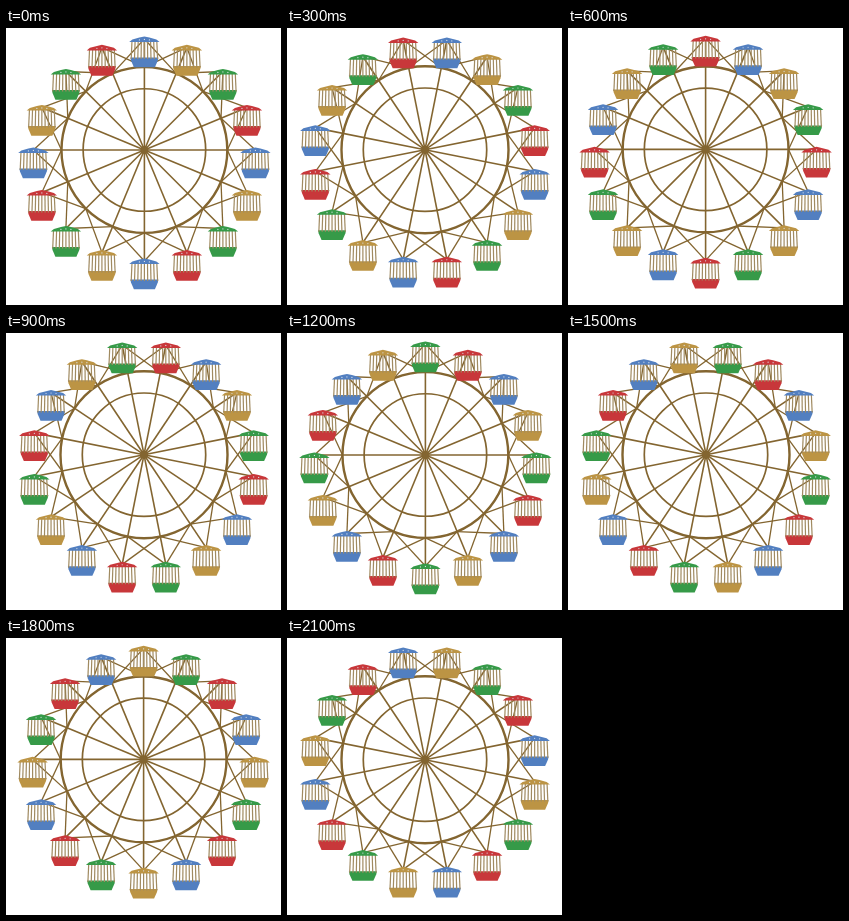
Animation of 275 by 277 pixels, one loop 2.4 s. Source, as an HTML page with a canvas:

```html
<!DOCTYPE html>
<html lang="en">
<head>
<meta charset="utf-8">
<title>Ferris wheel</title>
<style>
html, body { margin: 0; width: 100%; height: 100%; overflow: hidden; background: #fff; }
canvas { display: block; }
</style>
</head>
<body>
<canvas id="stage" width="275" height="277"></canvas>
<script>
const ctx = document.getElementById('stage').getContext('2d');
const BROWN = '#836530', BAR = '#a08a60';
const COLORS = ['#527fc0', '#bc9444', '#369a48', '#c8373a'];
const COUNT = 16, STEP = Math.PI * 2 / COUNT;
const POSES = 8, HOLD = 300;

const polar = (r, a) => [r * Math.sin(a), -r * Math.cos(a)];

function line(from, to, width, color = BROWN) {
  ctx.strokeStyle = color;
  ctx.lineWidth = width;
  ctx.beginPath();
  ctx.moveTo(...from);
  ctx.lineTo(...to);
  ctx.stroke();
}

function ring(r, width) {
  ctx.strokeStyle = BROWN;
  ctx.lineWidth = width;
  ctx.beginPath();
  ctx.arc(0, 0, r, 0, Math.PI * 2);
  ctx.stroke();
}

function dot(x, y, r, color) {
  ctx.fillStyle = color;
  ctx.beginPath();
  ctx.arc(x, y, r, 0, Math.PI * 2);
  ctx.fill();
}

// Fills a shape given by its right half, mirrored to the left
function symmetric(half, color) {
  const mirror = half.map(([x, y]) => [-x, y]).reverse();
  ctx.fillStyle = color;
  ctx.beginPath();
  [...half, ...mirror].forEach(p => ctx.lineTo(...p));
  ctx.fill();
}

function cabin([x, y], color) {
  ctx.save();
  ctx.translate(x, y);
  symmetric([[14, 18.5], [13.4, 21.5], [10.5, 28.2]], color);
  for (let i = -4; i <= 4; i++) line([i * 3.1, 2], [i * 3.3, 20], 1.2, BAR);
  symmetric([[0, -2.6], [5, -1.4], [12, 0.4], [15.2, 3]], color);
  for (let i = -1; i <= 1; i++) dot(i * 5, 0.4 + Math.abs(i) * 0.5, 0.6, '#dde3ea');
  ctx.restore();
}

function draw(pose) {
  // The axle sways slightly, and in-between poses are a touch larger
  const sway = Math.cos(pose * Math.PI / 2);
  const radius = 111 + 0.8 * (pose % 2);
  const rim = radius * 0.747;
  const angle = i => (i + pose / 2) * STEP;

  ctx.clearRect(0, 0, 275, 277);
  ctx.save();
  ctx.translate(138 + sway * 0.4, 121.7 + sway * 0.3);
  ring(rim, 2.4);
  ring(radius * 0.552, 1.7);
  for (let i = 0; i < COUNT; i++) {
    const pivot = polar(radius, angle(i));
    line([0, 0], pivot, 1.6);
    line(pivot, polar(rim, angle(i - 1)), 1.3);
    line(pivot, polar(rim, angle(i + 1)), 1.3);
  }
  dot(0, 0, 4, BROWN);
  for (let i = 0; i < COUNT; i++) cabin(polar(radius, angle(i)), COLORS[i % 4]);
  ctx.restore();
}

const start = performance.now();
function tick() {
  draw(Math.floor((performance.now() - start) / HOLD) % POSES);
  requestAnimationFrame(tick);
}
tick();
</script>
</body>
</html>
```
